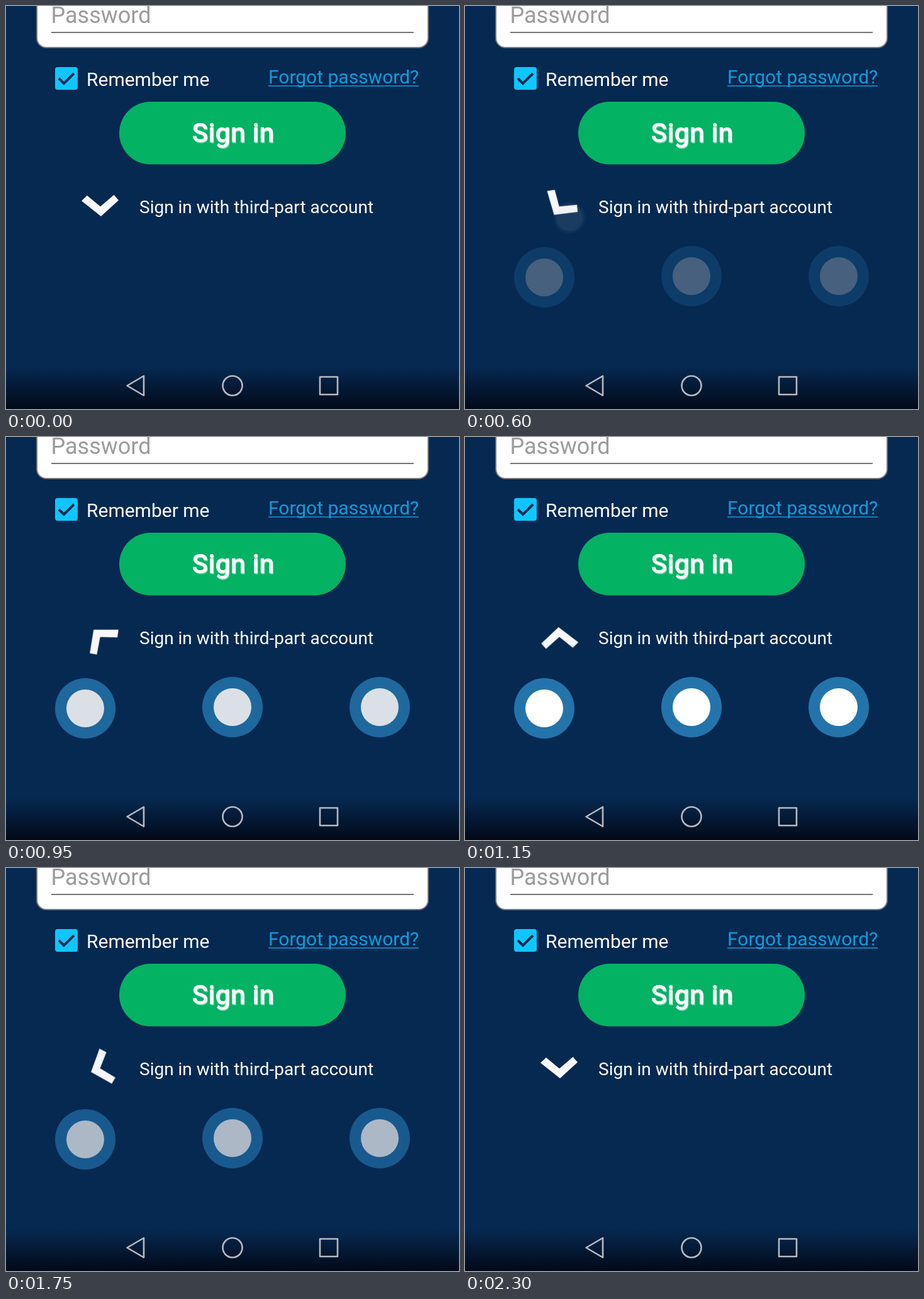
An HTML page that plays this animation: 720 by 640 pixels, repeating every 2.45 s.

```html
<!DOCTYPE html>
<html lang="en">
<head>
<meta charset="utf-8">
<title>Sign in</title>
<style>
  html, body { margin: 0; width: 100%; height: 100%; overflow: hidden; background: #062952; }
  svg { display: block; width: 720px; height: 640px; font-family: Roboto, sans-serif; }
  .arrow, .accounts, .touch { animation: 2450ms linear infinite; }
  .arrow { transform-origin: 150px 318px; animation-name: turn; }
  .accounts { animation-name: fade; }
  .touch { opacity: 0; }
  .first { animation-name: tap-open; }
  .second { animation-name: tap-close; }

  /* Each half turn snaps back once it has finished. */
  @keyframes turn {
    0%, 17.14% { transform: rotate(0deg); animation-timing-function: cubic-bezier(.4, 0, .75, .6); }
    24.49% { transform: rotate(35deg); }
    32.65% { transform: rotate(90deg); animation-timing-function: cubic-bezier(.3, .32, .6, 1); }
    46.94% { transform: rotate(179deg); }
    48.77% { transform: rotate(180deg); }
    48.78%, 61.22% { transform: rotate(0deg); }
    63.27% { transform: rotate(2deg); animation-timing-function: cubic-bezier(.35, .2, .7, .8); }
    79.59% { transform: rotate(147deg); animation-timing-function: cubic-bezier(.3, .5, .6, 1); }
    89.8% { transform: rotate(178deg); }
    93.46% { transform: rotate(180deg); }
    93.47%, 100% { transform: rotate(0deg); }
  }
  @keyframes fade {
    0%, 17.55% { opacity: 0; }
    24.49% { opacity: .26; }
    32.65% { opacity: .6; }
    42.04%, 62.45% { opacity: 1; }
    63.27% { opacity: .97; }
    79.59% { opacity: .38; }
    89.6%, 100% { opacity: 0; }
  }
  @keyframes tap-open {
    0%, 14.28% { opacity: 0; }
    14.29%, 20.41% { opacity: 1; }
    24.49% { opacity: .2; }
    26.1%, 100% { opacity: 0; }
  }
  @keyframes tap-close {
    0%, 57.13% { opacity: 0; }
    57.14%, 63.27% { opacity: 1; }
    69%, 100% { opacity: 0; }
  }
</style>
</head>
<body>
<svg viewBox="0 0 720 640">
  <defs>
    <linearGradient id="shade" x2="0" y2="1">
      <stop offset="0" stop-color="#020510" stop-opacity="0"/>
      <stop offset="1" stop-color="#020510" stop-opacity=".88"/>
    </linearGradient>
    <radialGradient id="glow">
      <stop offset="0" stop-color="#c8ccd8" stop-opacity=".58"/>
      <stop offset=".74" stop-color="#c8ccd8" stop-opacity=".58"/>
      <stop offset=".8" stop-color="#c8ccd8" stop-opacity=".34"/>
      <stop offset="1" stop-color="#c8ccd8" stop-opacity="0"/>
    </radialGradient>
    <g id="account">
      <circle r="48" fill="#2474ac"/>
      <circle r="30" fill="#fff"/>
    </g>
  </defs>

  <rect width="720" height="640" fill="#062952"/>
  <rect y="572" width="720" height="68" fill="url(#shade)"/>

  <rect x="49" y="-60" width="622" height="126" rx="15" fill="#fff" stroke="#77787c" stroke-width="2"/>
  <text x="71.500" y="27" font-size="36" fill="#9c9c9c">Password</text>
  <path d="M72 42H648" stroke="#777" stroke-width="2"/>

  <rect x="78" y="97" width="36" height="36" rx="4" fill="#10c6ff"/>
  <path d="M84 115l8 8 16-16" fill="none" stroke="#082a52" stroke-width="4"/>
  <text x="128" y="127" font-size="30" fill="#fff">Remember me</text>
  <text x="417" y="123" font-size="30" fill="#149bd7">Forgot password?</text>
  <path d="M417 127H656" stroke="#149bd7" stroke-width="1.6"/>

  <rect x="180" y="152" width="360" height="99.500" rx="49.75" fill="#04b264"/>
  <g font-size="43" font-weight="500" text-anchor="middle">
    <text x="362" y="217.500" fill="#dff5ea" opacity=".5">Sign in</text>
    <text x="361" y="216" fill="#fff" stroke="#fff" stroke-width=".5">Sign in</text>
  </g>

  <path class="arrow" d="M120 309.500L129 301 150 318.500 171.500 300 179 308.500 151 334Z" fill="#f7f7fb"/>
  <text x="212" y="329" font-size="28" fill="#fff">Sign in with third-part account</text>

  <g class="accounts">
    <use href="#account" x="126" y="431"/>
    <use href="#account" x="360" y="429"/>
    <use href="#account" x="594" y="429"/>
  </g>

  <circle class="touch first" cx="166" cy="336" r="27" fill="url(#glow)"/>
  <circle class="touch second" cx="163" cy="330" r="27" fill="url(#glow)"/>

  <g fill="none" stroke="#b6bac2" stroke-width="2.6" stroke-linejoin="round">
    <path d="M192.500 603l26.500-15.500v31z"/>
    <circle cx="360" cy="603" r="15.500"/>
    <rect x="499" y="589" width="28" height="28"/>
  </g>
</svg>
</body>
</html>
```
